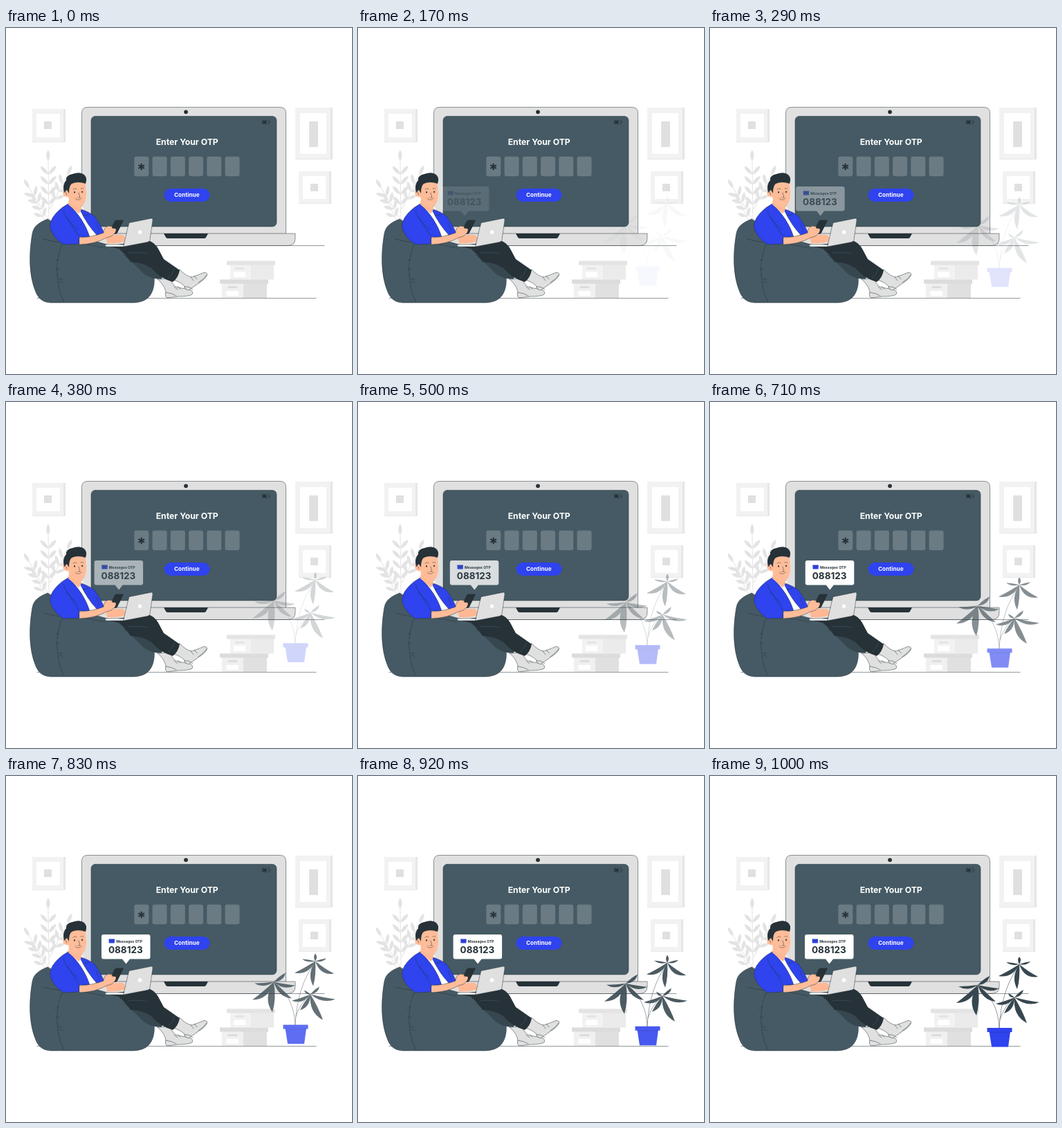
An HTML page that plays this animation: 500 by 500 pixels, repeating every 1040 ms.

```html
<!DOCTYPE html>
<html lang="en">
<head>
<meta charset="utf-8">
<title>Enter your OTP</title>
<style>
  html, body { margin: 0; width: 100%; height: 100%; overflow: hidden; background: #fff; }
  svg { display: block; width: 100vw; height: 100vh; }
  text { font-family: Inter, "Open Sans", sans-serif; font-weight: 700; }
  .ink { stroke: #263238; stroke-width: .5; stroke-linejoin: round; stroke-linecap: round; }
  .line { fill: none; }
</style>
</head>
<body>
<svg viewBox="0 0 500 500">
  <g id="frames"></g>
  <g id="shrub" fill="#e3e3e3"></g>

  <!-- big laptop -->
  <path class="ink" fill="#e0e0e0" d="M109.500 297V123Q109.500 114.500 118 114.500H396Q404.500 114.500 404.500 123V297Z"/>
  <rect class="ink" x="123" y="127.500" width="268" height="159.500" rx="6" fill="#455a64"/>
  <circle cx="260" cy="121.300" r="2.900" fill="#263238"/>
  <rect class="ink" x="370" y="133.300" width="10" height="5.600" rx="1.200" fill="none"/>
  <path fill="#263238" d="M371 134.300h5.500v3.600h-5.500ZM380.500 135h1v2.200h-1Z"/>
  <path class="ink" fill="#e0e0e0" d="M96 297H418V304Q418 314.500 407 314.500H96Z"/>
  <path fill="#263238" d="M228 297H292L289 302.500Q288 304 286 304H234Q232 304 231 302.500Z"/>
  <text x="261.700" y="168.800" font-size="12.200" text-anchor="middle" fill="#fff">Enter Your OTP</text>
  <g id="digits" fill="#6a7b83"></g>
  <path stroke="#263238" stroke-width="2.100" d="M195.700 195.700v9.600M191.500 198.100l8.400 4.800M199.900 198.100l-8.400 4.800"/>
  <rect x="228.500" y="232" width="66" height="19" rx="9.500" fill="#2f43ee"/>
  <text x="261.300" y="243.600" font-size="8.200" text-anchor="middle" fill="#fff">Continue</text>

  <path class="ink line" d="M100 314.500H460M45 390.500H448"/>

  <!-- storage boxes -->
  <path fill="#ebebeb" d="M324 342H387V363.500H324Z"/>
  <path fill="#f2f2f2" d="M324 342H354V363.500H324Z"/>
  <path fill="#e4e4e4" d="M319 336.500H389V342.500H319ZM331 346H344V349H331Z"/>
  <path fill="#e0e0e0" d="M312 369H377V390H312Z"/>
  <path fill="#f0f0f0" d="M312 369H343V390H312Z"/>
  <path fill="#dcdcdc" d="M309 363.500H379V369.500H309ZM320.500 373H334V376H320.500Z"/>
  <path fill="#fff" d="M329 352.500H346V360H329ZM318.500 380H336V387H318.500Z"/>

  <!-- bean bag -->
  <path class="ink" fill="#455a64" d="M60 276C48 281 40 286 38 297C33 325 33 356 42 379C46 391 53 396.500 65 397H182C200 397 208 390 212 379C216 368 215 352 208 341C197 324 178 316 150 314L100 300Z"/>
  <path class="ink line" d="M54 305Q66 309 82 310Q72 334 74 357Q76 382 84 396M82 310Q116 311 143 318M71 336q3 -2 5 -1M72 349q3 -2 5 0M76 362q4 0 6 2M77 366q3 0 5 2"/>

  <!-- far leg and shoes -->
  <path fill="#37474f" d="M170 328Q186 341 199 355Q207 362 224 363L234 351L205 328Z"/>
  <path class="ink" fill="#e0e0e0" d="M219 363L237 362Q241 373 248 375L266 378Q271 381 269 385Q264 388 249 388L233 390Q229 388 231 381Q228 370 219 363Z"/>
  <path class="ink line" d="M231 382Q240 383 246 387M243 374l5 4M248 373l4 4"/>
  <path class="ink" fill="#e0e0e0" d="M251 349Q260 359 269 360L286 353.500Q291 353 290.500 357Q288 363 278 369L264 379Q257 377 258 373Q252 367 242 364Z"/>
  <path class="ink line" d="M258 374Q265 373 270 378M267 360l4 5M272 358l4 5M278 368Q286 363 290 357"/>

  <!-- near leg -->
  <path fill="#263238" d="M146 315L205 307Q214 309 220 319L228 334L251 350Q249 361 241 367Q223 362 210 347Q199 339 180 338Q173 327 163 319Z"/>
  <path class="line" stroke="#455a64" stroke-width=".6" d="M176 325Q193 323 204 326M243 348Q241 356 234 361"/>

  <!-- torso -->
  <path fill="#fff" d="M99 258L110 258L130 298L121 305L106 303Z"/>
  <path class="ink" fill="#2f43ee" d="M90 254Q80 259 72 268Q62 279 64 290Q69 304 83 313L106 312L106 302H121Q113 276 90 254Z"/>
  <path class="ink" fill="#2f43ee" d="M106 261Q121 266 128 272Q137 284 142 297L132 300Q118 286 106 261Z"/>
  <path class="ink line" d="M83 263Q84 275 103 291M88 274L106 302M112 271l8 -2M130 281l5 13"/>
  <path fill="#ffb893" d="M91 247L109 255Q110 264 105 268Q96 260 90 255Z"/>

  <!-- head -->
  <path fill="#ffbc99" d="M89 222H114Q118 242 114 252Q110 260 102 258Q92 255 90 244Q83 245 82 238Q84 232 90 235Z"/>
  <path fill="#263238" d="M84 238Q81 226 87 220Q86 213 96 211Q107 207 113 212Q118 217 115 225Q104 221 95 225Q91 228 91 239L88 234Z"/>
  <path class="ink line" d="M85 237q3 1 3 4M97 233q3 -2 5 -.500M108 232q3 -1 4 0M105 238L107 245H104M100 246Q104 251 109 246" stroke-width=".8"/>
  <path fill="#263238" d="M99 236a1 1.400 0 1 0 .1 0M110 235.500a1 1.400 0 1 0 .1 0"/>

  <!-- arms, phone, small laptop -->
  <path fill="#ffb893" d="M144 302Q158 298 169 299Q174 303 171 309Q158 312 146 311Z"/>
  <path fill="#263238" d="M151 291L157 279Q158 277.500 160 277.500H169Q170 278 169 280L161 296Q160 298 157 298H152Z"/>
  <path class="ink" stroke-width=".3" fill="#ffbc99" d="M106 303Q126 302 141 296Q141 288 148 286L154 287L153 289L159 290V293L157 297Q153 302 145 303Q130 312 106 313Z"/>
  <path class="ink" fill="#fff" d="M143 313H172L170 316H145Q143 315 143 313Z"/>
  <path class="ink" fill="#e0e0e0" d="M178 281.500L210 275Q212.500 275 212 278L208 306Q207.500 309 204 309.500L170 316Z"/>
  <circle cx="193.500" cy="295" r="2.800" fill="#fff"/>

  <g id="bubble">
    <path fill="#fff" d="M140 229H204.500Q207.500 229 207.500 232V261.500Q207.500 264.500 204.500 264.500H178L172.500 271.500L167 264.500H140Q137 264.500 137 261.500V232Q137 229 140 229Z"/>
    <rect x="147.700" y="235.500" width="8.300" height="6" rx=".8" fill="#2f43ee"/>
    <path class="ink line" stroke-width=".4" d="M148 236L151.900 239L155.700 236"/>
    <text x="158.200" y="240.900" font-size="5.200" fill="#263238">Messages OTP</text>
    <text x="147" y="256" font-size="13.500" font-weight="800" fill="#263238">088123</text>
  </g>

  <g id="plant">
    <path class="ink line" d="M418 365Q417 325 387 302M418 365Q420 310 447 273M419 352Q425 332 440 320"/>
    <g id="blades" fill="#37474f"></g>
    <path fill="#2f43ee" d="M403.500 369H434L431 391.500H407Z"/>
    <path fill="#2f43ee" d="M400.500 364H436.500V370H400.500Z"/>
    <path class="line" stroke="#2434bd" stroke-width=".6" d="M403.500 370.300H434"/>
  </g>
</svg>

<script>
const el = id => document.getElementById(id);
const add = (id, markup) => el(id).insertAdjacentHTML('beforeend', markup);
const rect = (x, y, w, h, fill) =>
  `<rect x="${x}" y="${y}" width="${w}" height="${h}" fill="${fill}"/>`;

// A leaf from base to tip; bend shifts its belly to one side.
function leaf(x0, y0, x1, y1, width, bend = 0) {
  const dx = x1 - x0, dy = y1 - y0, len = Math.hypot(dx, dy);
  const ctrl = k => `${x0 + dx * .55 - dy / len * k} ${y0 + dy * .55 + dx / len * k}`;
  return `<path d="M${x0} ${y0}Q${ctrl(bend + width)} ${x1} ${y1}Q${ctrl(bend - width)} ${x0} ${y0}"/>`;
}

function wallFrame(x, y, w, h, pad, ix, iy, iw, ih) {
  add('frames', rect(x, y, w, h, '#f2f2f2') + rect(x + w - 3, y, 3, h, '#e6e6e6') +
    rect(x, y + h - 1, w, 1, '#e8e8e8') +
    rect(x + pad, y + pad + 1, w - 2 * pad - 2, h - 2 * pad - 2, '#fff') +
    rect(ix, iy, iw, ih, '#e0e0e0'));
}
wallFrame(38, 117, 48, 48, 6, 55, 135, 11, 11);
wallFrame(418, 115, 54, 75, 7, 438, 135, 13, 37);
wallFrame(423, 207, 47, 47, 6, 440, 225, 11, 11);

for (let i = 0; i < 6; i++)
  add('digits', `<rect x="${185.3 + i * 26.25}" y="185.800" width="21" height="28.500" rx="3"/>`);

// Each shrub stem carries leaf pairs up to a single tip leaf.
function stem(x0, y0, x1, y1, pairs, size) {
  const angle = Math.atan2(y1 - y0, x1 - x0);
  const at = (x, y, a, s) => leaf(x, y, x + Math.cos(a) * s, y + Math.sin(a) * s, s * .32);
  let out = `<path fill="none" stroke="#e3e3e3" d="M${x0} ${y0}L${x1} ${y1}"/>` + at(x1, y1, angle, size);
  for (let i = 0; i < pairs; i++) {
    const k = .3 + .65 * i / pairs;
    const x = x0 + (x1 - x0) * k, y = y0 + (y1 - y0) * k;
    out += at(x, y, angle - .75, size) + at(x, y, angle + .75, size);
  }
  add('shrub', out);
}
stem(62, 282, 61, 193, 4, 17);
stem(60, 275, 34, 232, 3, 16);
stem(63, 262, 88, 213, 3, 16);
stem(58, 282, 43, 252, 1, 15);

const clusters = [
  [447, 272, [[417, 289, 6, -7], [428, 269, 3, -2], [447, 261, 4, 0], [474, 290, 6, 8], [444, 308, 7, 4], [463, 268, 3, 2]]],
  [387, 302, [[356, 328, 7, -8], [359, 304, 4, -5], [385, 346, 10, 5], [404, 289, 5, 3], [418, 307, 5, 6], [413, 326, 6, 6]]],
  [440, 320, [[413, 329, 5, -6], [425, 343, 6, -4], [458, 357, 8, 6], [476, 327, 5, 6], [453, 309, 4, 2], [431, 314, 3, -2]]]
];
for (const [x, y, tips] of clusters)
  for (const [tx, ty, width, bend] of tips) add('blades', leaf(x, y, tx, ty, width, bend));

const LOOP = 1040, FPS = 24;
const clamp = v => Math.min(1, Math.max(0, v));

function draw(time) {
  const ms = Math.floor((time % LOOP + 5) * FPS / 1000) * 1000 / FPS;
  const shown = ms >= 120;

  const slide = clamp((ms - 110) / 490);
  const settle = Math.sin(Math.PI * clamp((ms - 600) / 400));
  el('bubble').setAttribute('transform', `translate(${-20.5 * (1 - slide) + settle} 0)`);
  el('bubble').setAttribute('opacity', shown ? slide : 0);

  const grow = clamp((ms - 110) / 890) ** 1.25;
  el('plant').setAttribute('transform', `translate(0 ${-20 * (1 - grow)})`);
  el('plant').setAttribute('opacity', shown ? grow : 0);
}

const start = performance.now();
function tick() {
  draw(performance.now() - start);
  requestAnimationFrame(tick);
}
draw(0);
requestAnimationFrame(tick);
</script>
</body>
</html>
```
